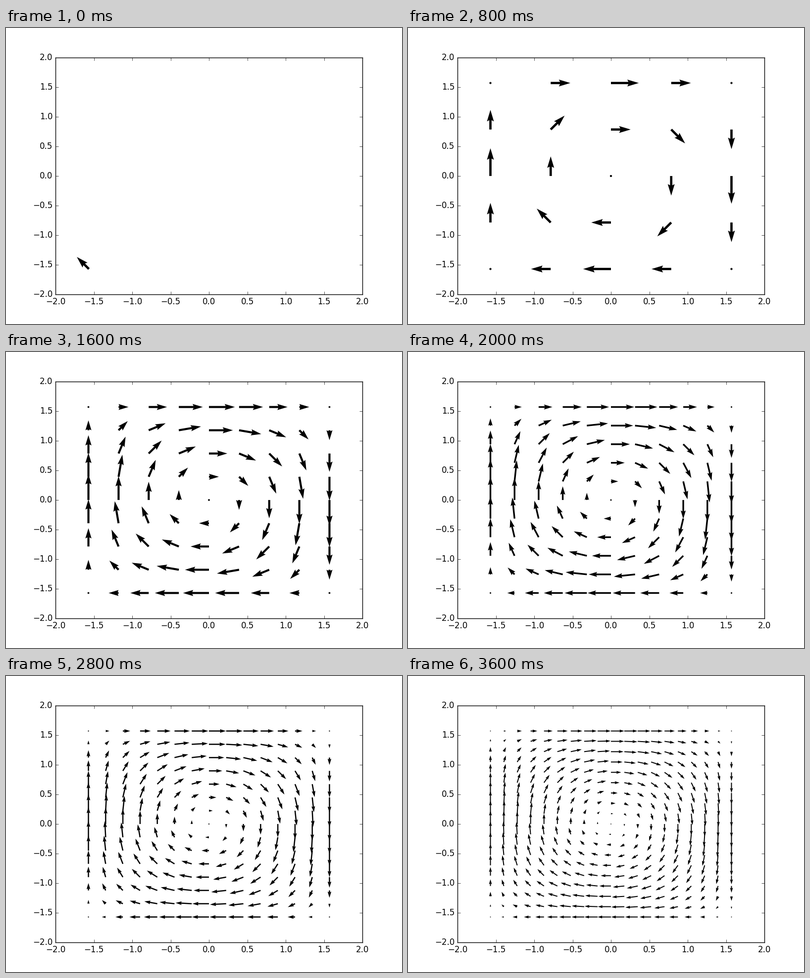
Recreate the animation shown at these times as a matplotlib script. Size 800 by 600 pixels, loop 3.8 s.

```python
import numpy as np
import matplotlib.pyplot as plt
from matplotlib.animation import FuncAnimation

FRAMES = 19
INTERVAL = 200

plt.style.use("classic")
plt.rcParams.update({
    "font.family": "DejaVu Sans",
    "font.size": 12,
    "axes.unicode_minus": True,
})

fig = plt.figure(figsize=(8, 6), dpi=100, facecolor="white")
ax = fig.add_axes([0.125, 0.1, 0.775, 0.8])
ax.set_xlim(-2, 2)
ax.set_ylim(-2, 2)
ticks = np.arange(-2, 2.1, 0.5)
ax.set_xticks(ticks)
ax.set_yticks(ticks)

arrows = None


def draw(i):
    """Show the vortex field on a grid of i + 1 points per side."""
    global arrows
    if arrows is not None:
        arrows.remove()
    side = np.linspace(-np.pi / 2, np.pi / 2, i + 1)
    x, y = np.meshgrid(side, side)
    u = np.cos(x) * np.sin(y)
    v = -np.cos(y) * np.sin(x)
    arrows = ax.quiver(x, y, u, v, color="black")
    return [arrows]


anim = FuncAnimation(fig, draw, frames=FRAMES, init_func=lambda: draw(0),
                     interval=INTERVAL, repeat=True, repeat_delay=0, blit=False)
plt.show()
```
